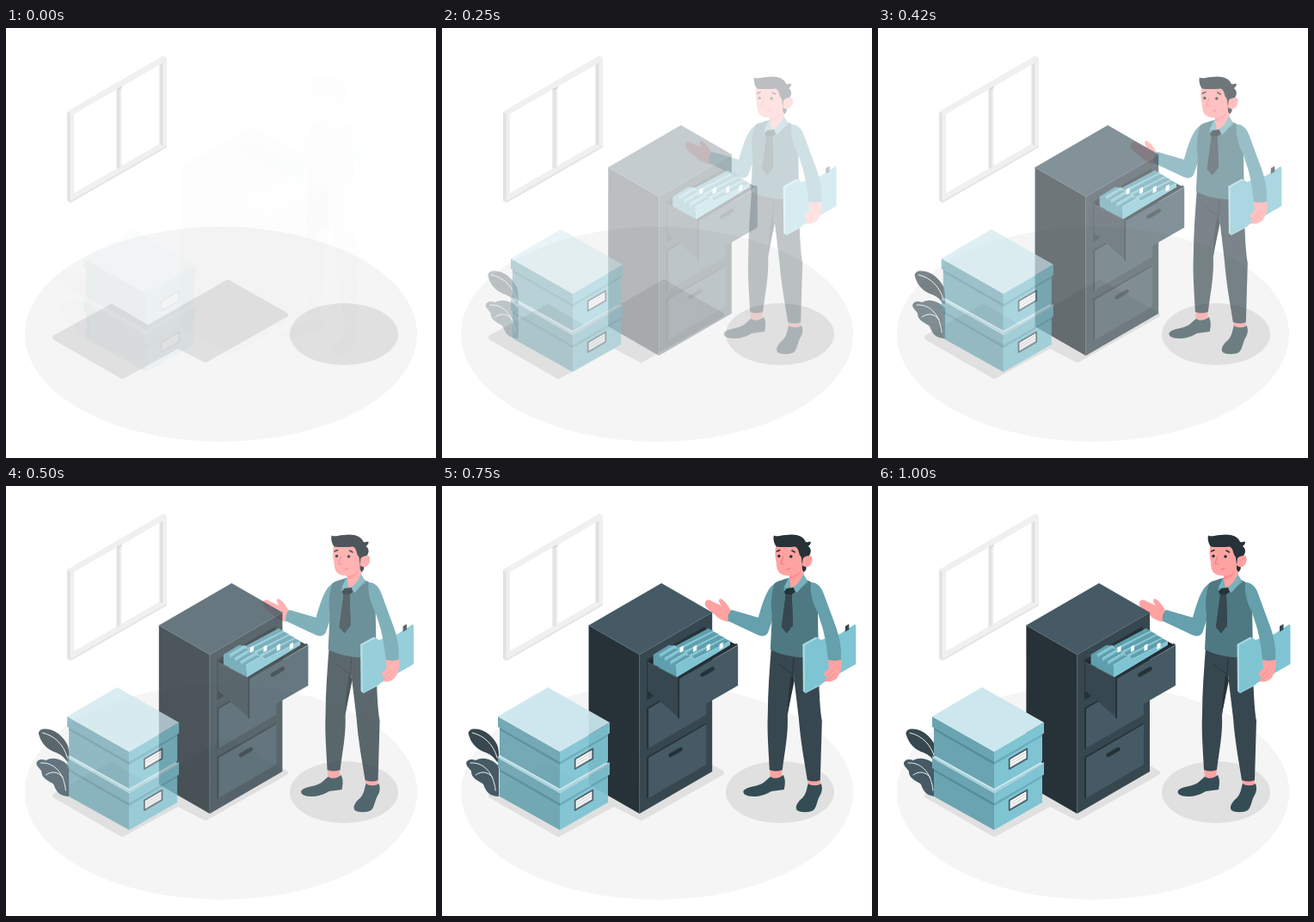
An HTML page for the animation above (1.04 s loop, 500 by 500 pixels).

```html
<!DOCTYPE html>
<html lang="en">
<head>
<meta charset="utf-8">
<title>Office filing</title>
<style>
  html, body { margin: 0; width: 100%; height: 100%; overflow: hidden; background: #fff; }
  svg { display: block; width: 100%; height: 100%; }
  .line { fill: none; stroke-linecap: round; stroke-linejoin: round; }
</style>
</head>
<body>
<svg viewBox="0 0 500 500">
  <defs>
    <g id="box">
      <path fill="#6ba4b1" d="M65 279L135 319V352L65 313Z"/>
      <path fill="#7fc4d3" d="M135 319L191 286V320L135 352Z"/>
      <path fill="#548c99" d="M65 279L135 319V324L65 283.500Z"/>
      <path fill="#66a9b8" d="M135 319L191 286V290.500L135 324Z"/>
      <path fill="#6ba4b1" d="M63 268L135 309V321L63 280Z"/>
      <path fill="#7fc4d3" d="M135 309L193 275V287.500L135 321Z"/>
      <path fill="#cce7ee" d="M63 268L121 234L193 275L135 309Z"/>
      <path fill="#fafafa" stroke="#455a64" stroke-width="1.800" stroke-linejoin="round" d="M152.700 317.500L173.300 305.500V317L152.700 329Z"/>
      <path class="line" stroke="#c9ced1" stroke-width="1" d="M155 320L171 310.700M155 323L171 313.700M155 326L171 316.700"/>
    </g>
    <g id="file">
      <path fill="#5f9eac" d="M267 208L285 197L292 197.500L274 208V223L267 219.500Z"/>
      <path fill="#5f9eac" d="M290 199.500L331 177.500L337 180.500L295 202Z"/>
      <path fill="#7fc4d3" d="M274 208L292 197.500L295 201.500L337 180.500V185L274 223Z"/>
      <path class="line" stroke="#a8d9e4" stroke-width=".8" d="M274 208L292 197.500L295 201.500L337 180.500"/>
    </g>
  </defs>

  <!-- room -->
  <ellipse cx="250" cy="356" rx="228" ry="125" fill="#f5f5f5"/>
  <g fill="#e0e0e0">
    <path stroke="#e0e0e0" stroke-width="6" stroke-linejoin="round" d="M57 360L123 324L165 348.500L258 295.500L325 333.500L232 386L200 369.500L135 405Z"/>
    <ellipse cx="393" cy="356" rx="63" ry="36"/>
  </g>
  <g>
    <path fill="#f0f0f0" stroke="#f0f0f0" stroke-linejoin="round" d="M71.500 97.500L183 32.500L186.500 34.500V138.500L75 202.500L71.500 200.500Z"/>
    <path fill="#e3e3e3" d="M71 97.500L75 99.500V203L71 200.800Z"/>
    <path fill="#fff" d="M79 100L128.500 71.500V163.500L79 192ZM134.500 68.500L179 42.500V134.500L134.500 160Z"/>
    <path fill="#e0e0e0" d="M178.500 43L182.500 40.500V137L178.500 134.700Z"/>
    <path fill="#e3e3e3" d="M128.500 71L132.500 68.700V163.500L128.500 163Z"/>
    <path fill="#d6d6d6" d="M128.500 71.500L134.500 68V70L130 72.500Z"/>
    <path class="line" stroke="#e3e3e3" stroke-width="1.500" d="M75.500 202L186.500 138"/>
  </g>

  <!-- man -->
  <g id="man">
    <path fill="#ffa3a2" d="M379 328H394L393 340H380ZM423 340H438L438 350H424Z"/>
    <path fill="#344d55" d="M380 338C384 341 391 340 395 336C398 342 397 347 396 353L381 355C374 359 368 361 360 361C352 361 347 358 349 354C353 349 365 350 372 345Z"/>
    <path fill="#344d55" d="M424 346C428 349 435 349 439 346C441 352 440 356 437 361C434 367 434 373 430 377C425 380 415 380 411 377C408 373 412 367 417 363C422 358 422 352 424 346Z"/>
    <path fill="#37474f" d="M381 188H436C436 222 437 256 440 273L438 342Q431 345 423 342C419 317 415 296 413 270L407 220C405 240 402 253 400 267C401 288 397 306 394 330Q386 333 379 330C378 308 376 287 377 265C377 240 379 214 381 188Z"/>
    <path fill="#263238" d="M406 219L408 226L400 264C400 250 402 234 404 221Z"/>
    <path class="line" stroke="#263238" stroke-width=".9" d="M390 207C396 212 401 216 406 219L407 200"/>

    <path fill="#ffa3a2" d="M331 158C326 157 320 155 316 150C310 145 305 142 304 138C303 133 308 131 312 134L323 139C320 135 319 132 322 131C327 133 331 139 335 146Z"/>
    <path fill="#65a0ac" d="M386 113C377 117 372 132 366 153L335 144C331 148 330 152 331 157L365 173C371 176 377 174 378 168L387 143Z"/>
    <path fill="#4e7983" d="M385 113C389 110 395 109 401 107L424 110C431 112 435 123 435 137L436 198C418 201 397 199 380 190L382 150C380 138 381 124 385 113Z"/>
    <path fill="#65a0ac" d="M400 108L395 121L404 124L414 119L424 112L418 102Z"/>
    <path fill="#ffa3a2" d="M402 97H419V104C416 112 409 117 404 119C401 115 401 110 402 106Z"/>
    <path fill="#ff8f91" d="M402 104C408 103 412 101 416 97C414 104 409 108 402 109Z"/>
    <path fill="#78b2bd" d="M402 107L396 117L401 123L404 119ZM404 119C411 116 415 110 418 103L422 111L411 124Z"/>
    <path fill="#263238" d="M399 119L407 118L409 123L405 126L406 162L399 171L393 164L398 127L396 123Z"/>
    <path fill="#37474f" d="M398 126L405 126L406 162L399 171L393 164Z"/>

    <path fill="#a8d9e4" d="M417.500 184L433 175.500L438 178L440 231L421 241L418 238.500Z"/>
    <path fill="#7fc4d3" d="M420 185L435 177L439 179L461 172L478 161Q479.500 161 479.500 163V207L421 240.500Q420 241 420 239Z"/>
    <path fill="#37474f" d="M467 163L471.500 160.500V167L467 169.500Z"/>
    <path fill="#ffa3a2" d="M447 200H462C464 210 462 217 457 224C452 228 446 229 443 226L447 221C444 222 441 220 443 217L448 212Z"/>
    <path class="line" stroke="#f28789" stroke-width=".8" d="M447 221L453 214M443 226C448 225 451 222 454 219"/>
    <path fill="#65a0ac" d="M427 112C435 112 440 118 443 128L457 166C461 179 463 190 462 202Q455 204 447 202C446 190 444 178 441 166L435 147C429 136 426 124 427 112Z"/>

    <path fill="#ffa3a2" d="M387 67C394 62 412 63 420 69L423 81C428 79 430 84 428 89C426 94 421 95 418 94C415 101 407 106 398 104C390 103 387 98 387 89C385 82 385 74 387 67Z"/>
    <path fill="#263238" d="M384 57.500C388 59.500 391 57.500 398 57C409 55 419 58 421 65C424 66 425 64 427 65C427 68 425 69 424 70C428 73 428 78 424 82C420 82 419 86 420 92C423 94 422 98 419 100L417 97V91C416 86 417 83 414 80C413 76 412 72 409 70.500C400 71.500 391 71 387 70.500C384 67 383 61 384 57.500Z"/>
    <path fill="#ffa3a2" d="M418 84C423 79 429 81 428 88C427 94 421 96 417 92Z"/>
    <path class="line" stroke="#f28789" stroke-width=".8" d="M421 88C423 85 425 84 427 84"/>
    <g fill="#263238"><circle cx="390" cy="81.500" r="1.700"/><circle cx="404" cy="82" r="1.800"/></g>
    <path class="line" stroke="#263238" stroke-width="1.500" d="M387.500 76L391 74.500M405 75L408.500 77"/>
    <path class="line" stroke="#f07a7d" stroke-width="1.100" d="M395 82L392 90L396 91M399 97Q401 97 403 95.500"/>
  </g>

  <!-- cabinet -->
  <g id="cabinet">
    <path fill="#263238" d="M172.400 162L231.500 196V381L172.400 347Z"/>
    <path fill="#37474f" d="M231.500 196L316 147V332L231.500 381Z"/>
    <path fill="#455a64" d="M172.400 162L257 113L316 147L231.500 196Z"/>
    <path class="line" stroke="#566a73" stroke-width=".7" d="M172.400 162L231.500 196L316 147M231.500 196V380"/>
    <path fill="#263238" d="M240 202L308 163V209L240 249Z"/>
    <path fill="#263238" d="M240 258L308 219V266L240 306ZM240 315L308 276V324L240 364Z"/>
    <path fill="#455a64" d="M242 259L309 220V266L242 305ZM242 316L309 277V324L242 363Z"/>
    <path class="line" stroke="#263238" stroke-width="4.500" d="M267.500 313L279.500 306"/>
    <path fill="#1f292e" d="M241 205L308 166L345 185L278 224Z"/>
    <use href="#file" x="-19.500" y="-12"/>
    <use href="#file" x="-13" y="-8"/>
    <use href="#file" x="-6.500" y="-4"/>
    <use href="#file"/>
    <path fill="#fff" d="M278.500 188L282.500 185.700V191.500L278.500 194ZM294 187L298 184.700V191L294 193.300ZM309.500 185.500L313.500 183.200V190L309.500 192.300ZM324.500 184L328.500 181.700V188L324.500 190.300Z"/>
    <path fill="#37474f" d="M241 205L278 224V270L241 238Z"/>
    <path class="line" stroke="#4b5e67" stroke-width=".9" d="M241 205L277 223.500"/>
    <path fill="#263238" d="M276 222L344 183L346 184.500L278 224V271L276 269.500Z"/>
    <path fill="#455a64" d="M278 224L346 185V232L278 271Z"/>
    <path class="line" stroke="#263238" stroke-width="4.800" d="M304.500 219.500L316.500 212.500"/>
  </g>

  <!-- plant -->
  <g id="plant">
    <path fill="#37474f" d="M32.500 288C32.500 284 36 282 41 282.500C52 283 61 291 66 301C68 306 68 312 68 320L66 321C62 315 57 311 50 309C41 305 35 298 32.500 288Z"/>
    <path fill="#455a64" d="M30 323C30 318 36 317 41 319C50 314 61 318 68 326V361C58 361 53 356 50 347C46 343 38 342 36 334C37 330 31 328 30 323Z"/>
    <path class="line" stroke="#fff" stroke-width=".9" d="M37 287C51 290 62 301 66 316M35 322C51 321 62 334 64 354M41 336C48 331 55 332 61 339"/>
  </g>

  <!-- boxes -->
  <g id="boxes">
    <use href="#box" y="48"/>
    <path fill="#a5d2dc" d="M63 314L135 354L193 321L193 323L135 357L63 316Z"/>
    <use href="#box"/>
  </g>
</svg>
<script>
const LOOP = 1040, FPS = 24, SHIFT = 30;

// CSS-like cubic bezier easing, solved by bisection
function bezier(x1, y1, x2, y2) {
  const at = (a, b, s) => 3 * a * s * (1 - s) ** 2 + 3 * b * s * s * (1 - s) + s ** 3;
  return x => {
    if (x >= 1) return 1;
    let lo = 0, hi = 1;
    for (let i = 0; i < 30; i++) {
      const mid = (lo + hi) / 2;
      if (at(x1, x2, mid) < x) lo = mid; else hi = mid;
    }
    return at(y1, y2, lo);
  };
}

const easeOut = bezier(0, 0, 0.58, 1);
const overshoot = bezier(0.36, -0.01, 0.5, 1.38);

const actors = [
  ["man", -SHIFT, overshoot],
  ["cabinet", SHIFT, overshoot],
  ["plant", SHIFT, overshoot],
  ["boxes", SHIFT, easeOut]
].map(([id, from, ease]) => ({ el: document.getElementById(id), from, ease }));

// steps at 24 per second, starting on whole hundredths of a second
function progress(ms) {
  const step = Math.floor((Math.floor(ms / 10) * 10 + 4.9) * FPS / 1000);
  return Math.min(1, (step + 1) / FPS);
}

function draw(ms) {
  const p = progress(ms);
  for (const { el, from, ease } of actors) {
    const k = ease(p);
    el.setAttribute("transform", `translate(${(from * (1 - k)).toFixed(3)} 0)`);
    el.setAttribute("opacity", Math.max(0, Math.min(1, k)).toFixed(4));
  }
}

const start = performance.now();
function tick() {
  draw((performance.now() - start) % LOOP);
  requestAnimationFrame(tick);
}
tick();
</script>
</body>
</html>
```
